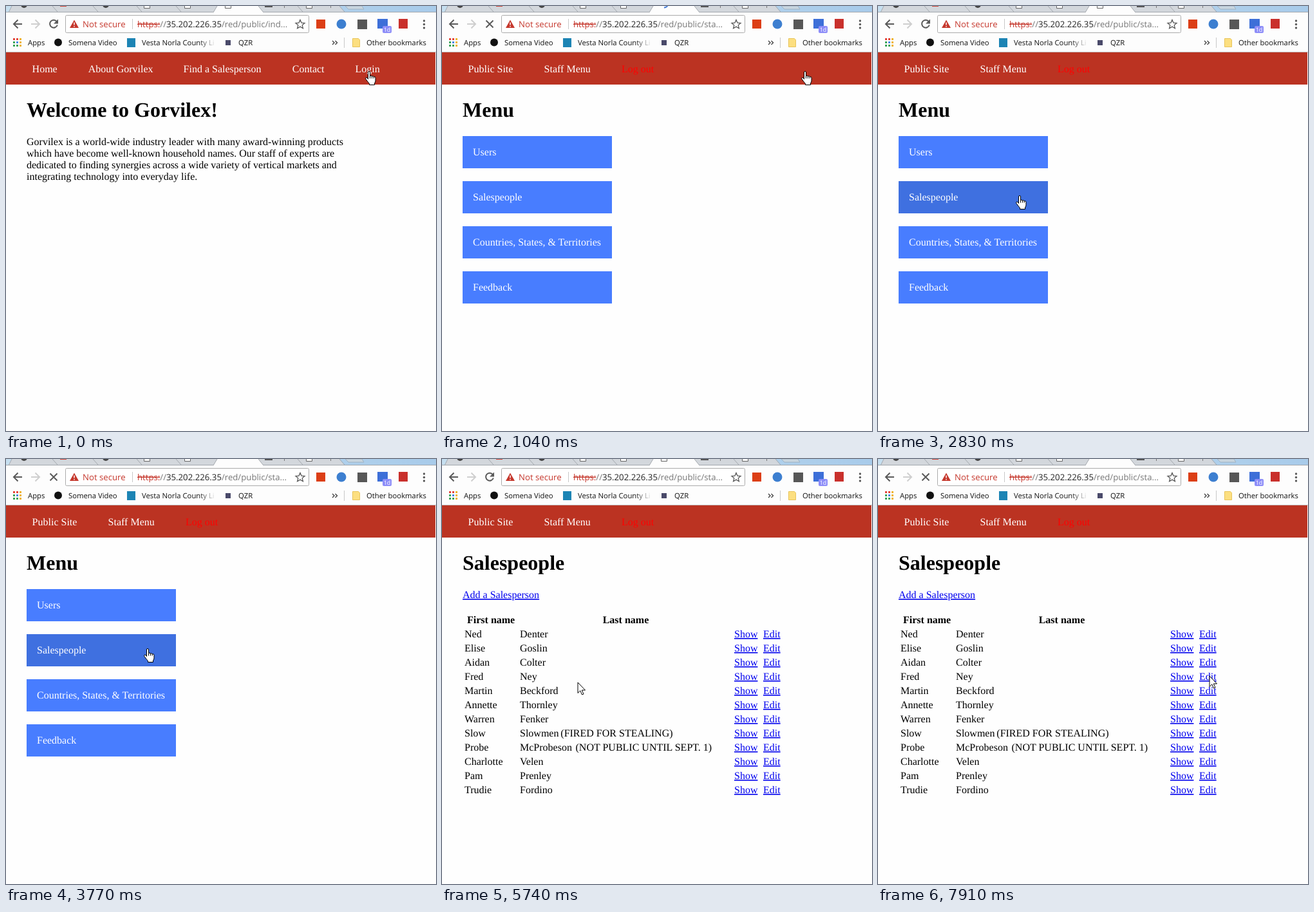
Animation of 668 by 660 pixels, one loop 8 s. Source, as an HTML page:

```html
<!DOCTYPE html>
<html lang="en">
<head>
<meta charset="utf-8">
<title>Staff site walkthrough</title>
<style>
  html, body { margin: 0; width: 100%; height: 100%; overflow: hidden; background: #fefefe; }
  svg { display: block; width: 668px; height: 660px; text-rendering: geometricPrecision; }
  text { white-space: pre; }
  .page text { font: 16px "Liberation Serif", "Times New Roman", serif; }
  .page .h1 { font-size: 32px; font-weight: bold; }
  .page .th { font-weight: bold; }
  .light { fill: #fff; }
  .logout { fill: #f00; }
  .link { fill: #00e; text-decoration: underline 1px; }
  .button { fill: #487dff; }
  .button.hover { fill: #3f70e0; }
  .url text { font: 13.2px "Open Sans", "Noto Sans", sans-serif; }
  .marks text { font: 11.3px "Open Sans", "Noto Sans", sans-serif; fill: #111; }
  .line { fill: none; stroke: #5a5a5a; stroke-width: 2; }
  .edge { fill: none; stroke: #a3a8ae; }
  .cursor path { fill: #fff; stroke: #000; stroke-linejoin: round; }
</style>
</head>
<body>
<svg viewBox="0 0 668 660">
  <defs>
    <linearGradient id="sky">
      <stop offset="0" stop-color="#c6dff0"/>
      <stop offset="1" stop-color="#a8cbea"/>
    </linearGradient>
    <linearGradient id="fade" gradientUnits="userSpaceOnUse" x1="300" x2="326">
      <stop offset="0" stop-color="#111"/>
      <stop offset="1" stop-color="#111" stop-opacity="0"/>
    </linearGradient>
    <path id="sheet" d="M-4.5-8v11.5h9V-8" fill="#fff" stroke="#666"/>
  </defs>
  <rect width="668" height="660" fill="#fefefe"/>

  <!-- tab strip -->
  <rect width="668" height="10" fill="url(#sky)"/>
  <path d="M4 10L9 0H518L526 10Z" fill="#d3d7dc"/>
  <path d="M527 0l5 5H556l-3-5Z" fill="#c9d6e0" stroke="#9fb2c2"/>
  <path class="edge" d="M4 10L9 0M72 0l8 9M135 0l8 9M203 0l8 9M264 0l8 9M453 0l8 9M518 0l8 9M0 9.5H668"/>
  <circle cx="28" cy="-2" r="5" fill="#444"/>
  <rect x="84" y="-9" width="10" height="10" fill="#d0453b"/>
  <circle cx="155" cy="-2" r="5" fill="#444"/>
  <rect x="402" y="-9" width="12" height="11" fill="#555"/>
  <path d="M432.5 0v3M504.5 0v3" stroke="#777"/>
  <use href="#sheet" x="219"/>
  <use href="#sheet" x="282"/>
  <use href="#sheet" x="471"/>
  <path d="M322 10L328 0H392L400 10Z" fill="#fdfdfd"/>
  <path class="edge" d="M322 10L328 0M392 0L400 10"/>
  <use href="#sheet" x="345" id="favicon"/>
  <path id="spinner" d="M350.6-.8A6.5 6.5 0 0 1 345 2.5" fill="none" stroke="#4a80d8" stroke-width="2"/>

  <!-- toolbar -->
  <rect y="10" width="668" height="61" fill="#fdfdfd"/>
  <rect y="71" width="668" height="1" fill="#c4c0c0"/>
  <path class="line" d="M25 28H12M18.5 21.5L12 28l6.5 6.5"/>
  <path class="line" d="M39 28H52M45.5 21.5L52 28l-6.5 6.5" style="stroke:#cfcfcf"/>
  <g id="reload"><path class="line" d="M78.7 23.8A6 6 0 1 0 79.8 29.5"/><path d="M81 20.5v7h-7Z" fill="#5a5a5a"/></g>
  <path id="stop" class="line" d="M68.5 22.5l11 11m0-11l-11 11"/>
  <rect x="92.5" y="14.5" width="378" height="27" rx="2" fill="#fff" stroke="#ababab"/>
  <path d="M106 21.5L113 34H99Z" fill="#c5372c"/>
  <path d="M106 25.5v4M106 31v1.5" stroke="#fff" stroke-width="1.5"/>
  <path d="M196.5 20v16" stroke="#c8c8c8"/>
  <g class="url">
    <text x="119" y="33" fill="#c5372c">Not secure</text>
    <text x="204" y="33" fill="#777"><tspan fill="#c5372c" text-decoration="line-through">https:</tspan>//<tspan fill="#222">35.202.226.35</tspan>/red/public/<tspan id="path">ind...</tspan></text>
  </g>
  <path d="M457 21.5l2 4.600 5 .4-3.800 3.300 1.200 4.900-4.400-2.600-4.400 2.600 1.200-4.900-3.800-3.300 5-.4Z" fill="none" stroke="#5a5a5a" stroke-width="1.3"/>
  <rect x="482" y="21" width="14" height="14" fill="#dc3e15"/>
  <circle cx="521" cy="28" r="7.5" fill="#3d7fd0"/>
  <rect x="546" y="21" width="15" height="15" fill="#575757"/>
  <rect x="577" y="20" width="16" height="15" fill="#3d6fd8"/>
  <rect x="585" y="31" width="14" height="11" rx="2" fill="#8d8df8"/>
  <text x="592" y="39.5" text-anchor="middle" fill="#fff" font-size="9" font-family="Open Sans, sans-serif">1d</text>
  <rect x="610" y="20" width="14" height="15" fill="#c9302c"/>
  <g fill="#5a5a5a"><circle cx="649.5" cy="23" r="1.7"/><circle cx="649.5" cy="28.5" r="1.7"/><circle cx="649.5" cy="34" r="1.7"/></g>

  <!-- bookmarks -->
  <g class="marks">
    <g id="apps"></g>
    <text x="34" y="61">Apps</text>
    <circle cx="81" cy="56.5" r="6" fill="#111"/>
    <text x="97" y="61">Somena Video</text>
    <rect x="188" y="50" width="13" height="14" fill="#1c84b4"/>
    <text x="211" y="61" style="fill:url(#fade)">Vesta Norla County Li</text>
    <rect x="341" y="53" width="8" height="8" fill="#4a4a6a"/>
    <text x="361" y="61">QZR</text>
    <path d="M507 54l3 3-3 3M511.5 54l3 3-3 3" fill="none" stroke="#444" stroke-width="1.4"/>
    <path d="M525.5 49v16" stroke="#c8c8c8"/>
    <path d="M538.5 50.5h9l2 2v11h-11Z" fill="#fcdf80" stroke="#e8c45c"/>
    <text x="560" y="61">Other bookmarks</text>
  </g>

  <rect y="72" width="667" height="50" fill="#bb3322"/>
  <g class="page" id="home"></g>
  <g class="page" id="staff"></g>
  <g class="page" id="menu"></g>
  <g class="page" id="sales"></g>

  <g class="cursor" id="cursor">
    <path id="arrow" d="M0 0V16.5l3.800-3.700 2.700 6.200 2.500-1-2.700-6h5.200Z"/>
    <g id="hand" transform="translate(-5)">
      <path d="M4.5 2a1.5 1.5 0 0 1 3 0V7.5q1.6-1 2.9.5 1.8-.8 2.8.8 2.6-.5 2.8 1.7V15q0 2-1.5 4v2.5H6.5v-2Q4.5 17.5 1 12.5 0 10.5 1.8 10q1.4 0 2.7 2.5Z"/>
      <path d="M7.5 7.5v4M10.4 8v3.5M13.2 9v2.5"/>
    </g>
  </g>
</svg>
<script>
const $ = id => document.getElementById(id);
const label = (x, y, text, cls = '') => `<text x="${x}" y="${y}" class="${cls}">${text}</text>`;
const show = (id, on) => { $(id).style.display = on ? '' : 'none'; };

$('apps').innerHTML = ['#e5443a', '#e5443a', '#f0b429', '#38a457', '#4a86e8', '#f0b429', '#38a457', '#38a457', '#f0b429']
  .map((c, i) => `<rect x="${11 + i % 3 * 5}" y="${50 + (i / 3 | 0) * 5}" width="3" height="3" fill="${c}"/>`).join('');

$('home').innerHTML =
  [[40.6, 'Home'], [127.7, 'About Gorvilex'], [275.6, 'Find a Salesperson'], [444.8, 'Contact'], [542.6, 'Login']]
    .map(([x, s]) => label(x, 103, s, 'light')).join('') +
  label(32, 172, 'Welcome to Gorvilex!', 'h1') +
  ['Gorvilex is a world-wide industry leader with many award-winning products',
   'which have become well-known household names. Our staff of experts are',
   'dedicated to finding synergies across a wide variety of vertical markets and',
   'integrating technology into everyday life.'].map((s, i) => label(32, 216 + i * 18, s)).join('');

$('staff').innerHTML = label(40.6, 103, 'Public Site', 'light') +
  label(158.6, 103, 'Staff Menu', 'light') + label(279, 103, 'Log out', 'logout');

$('menu').innerHTML = label(32, 172, 'Menu', 'h1') +
  ['Users', 'Salespeople', 'Countries, States, &amp; Territories', 'Feedback'].map((s, i) =>
    `<rect class="button" x="32" y="${202 + i * 70}" width="232" height="50"/>` +
    label(48, 232 + i * 70, s, 'light')).join('');

const people = ['Ned Denter', 'Elise Goslin', 'Aidan Colter', 'Fred Ney', 'Martin Beckford', 'Annette Thornley',
  'Warren Fenker', 'Slow Slowmen', 'Probe McProbeson', 'Charlotte Velen', 'Pam Prenley', 'Trudie Fordino'];
$('sales').innerHTML = label(32, 172, 'Salespeople', 'h1') + label(32, 216, 'Add a Salesperson', 'link') +
  label(39, 255, 'First name', 'th') + label(249.7, 255, 'Last name', 'th') +
  people.map((name, i) => {
    const [first, last] = name.split(' '), y = 277 + i * 22;
    return label(35, y, first) + label(121, y, last) + label(454, y, 'Show', 'link') + label(499, y, 'Edit', 'link');
  }).join('') +
  label(184.3, 431, '(FIRED FOR STEALING)') + label(207.5, 453, '(NOT PUBLIC UNTIL SEPT. 1)');

const target = document.querySelectorAll('.button')[1];

// Point on a Bezier curve with any number of control points
function bezier(pts, u) {
  while (pts.length > 1)
    pts = pts.slice(1).map((p, i) => p.map((v, k) => pts[i][k] + (v - pts[i][k]) * u));
  return pts[0];
}

const smooth = u => u * u * (3 - 2 * u);
// The pointer advances in discrete steps along each path
const moves = [
  { at: 1600, step: 131, n: 8, ease: smooth, pts: [[563, 101], [400, 200], [244, 276]] },
  { at: 2680, step: 150, n: 2, ease: u => u, pts: [[244, 276], [219, 294]] },
  { at: 4430, step: 143, n: 8, ease: u => u, pts: [[219, 294], [150, 212], [-158, 300], [127, 332]] },
  { at: 5590, step: 137, n: 8, ease: u => u ** 1.43, pts: [[127, 332], [450, 394], [507, 344]] },
  { at: 6670, step: 135, n: 3, ease: u => u, pts: [[507, 344], [515, 337]] }
];

function pointer(t) {
  let pos = moves[0].pts[0];
  for (const m of moves) {
    if (t < m.at) break;
    const k = Math.min(m.n, Math.floor((t - m.at) / m.step) + 1);
    pos = bezier(m.pts, m.ease(k / m.n));
  }
  return pos;
}

function draw(t) {
  const [x, y] = pointer(t).map(Math.round);
  const page = t < 1040 ? 'home' : t < 3900 ? 'menu' : 'sales';
  const loading = t >= 460 && t < 1190 || t >= 3380 && t < 3900 || t >= 7910;
  const hover = page === 'menu' && x >= 32 && x < 264 && y >= 272 && y < 322;
  const hand = t < 1600 || hover || t >= 3900 && t < 4430 || t >= 6540 && t < 7910;

  for (const id of ['home', 'menu', 'sales']) show(id, id === page);
  show('staff', page !== 'home');
  show('reload', !loading);
  show('stop', loading);
  show('favicon', !loading);
  show('spinner', loading);
  $('spinner').setAttribute('transform', `rotate(${(t - 1040) / 1050 * 360} 345 -4)`);
  $('path').textContent = t < 610 ? 'ind...' : 'sta...';
  target.classList.toggle('hover', hover);
  show('hand', hand);
  show('arrow', !hand);
  $('cursor').setAttribute('transform', `translate(${x} ${y})`);
}

const start = performance.now();
function tick() {
  draw((performance.now() - start) % 8000);
  requestAnimationFrame(tick);
}
tick();
</script>
</body>
</html>
```
